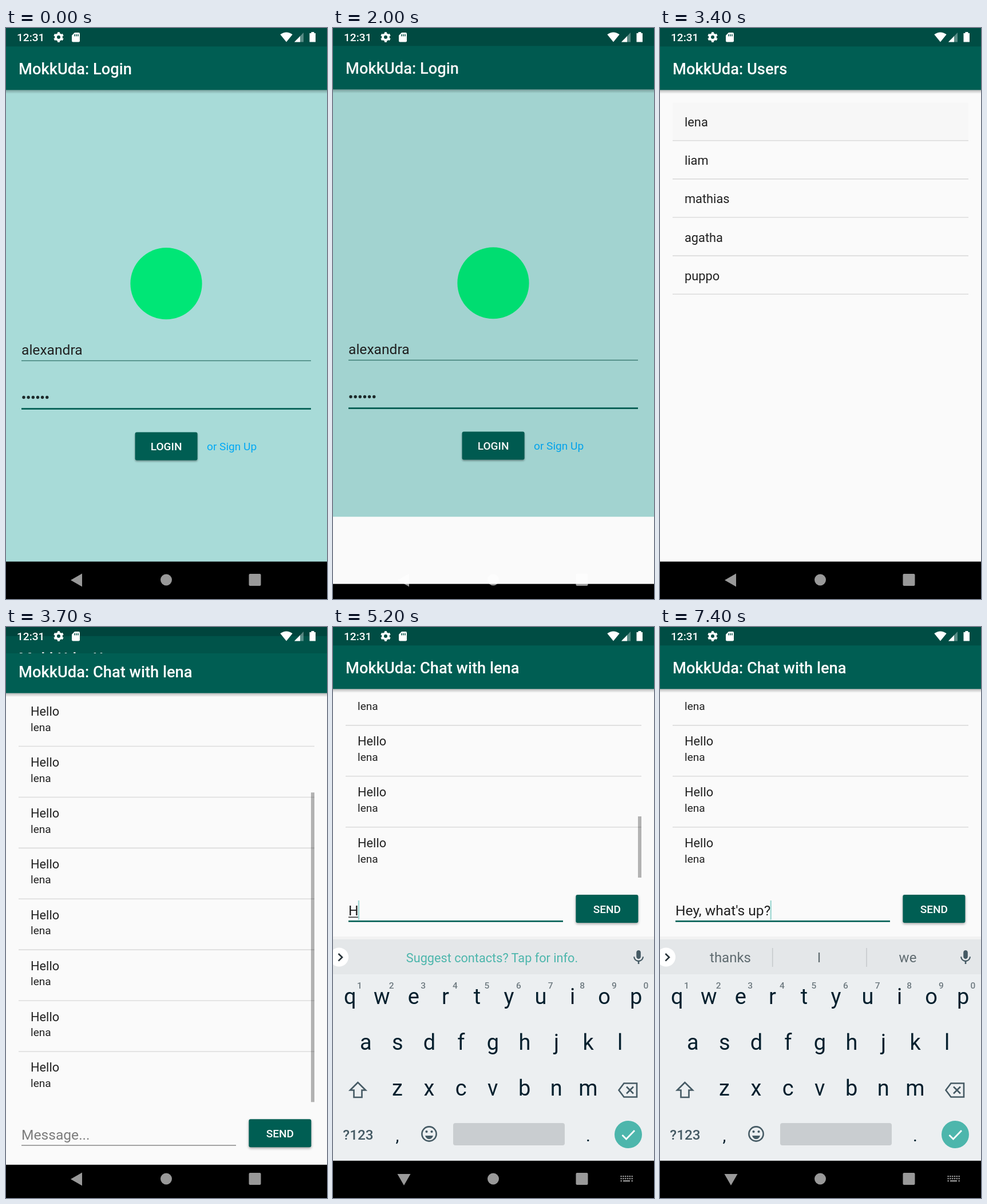
Recreate the animation shown at these times as an HTML page. Size 561 by 998 pixels, loop 8000 ms.

```html
<!DOCTYPE html>
<html lang="en">
<head>
<meta charset="utf-8">
<title>Chat app</title>
<style>
  html, body { margin: 0; width: 100%; height: 100%; overflow: hidden; background: #000; }
  svg { display: block; width: 100vw; height: 100vh; }
  text { font-family: Roboto, sans-serif; fill: #212121; white-space: pre; }
  .medium { font-weight: 500; }
  .white { fill: #fff; }
  .mid { text-anchor: middle; }
  .raised { filter: drop-shadow(0 2px 2px rgba(0, 0, 0, .36)); }
  .rule { fill: none; stroke: #dcdcdc; stroke-width: 1.6; }
  .glyph { fill: none; stroke: #455a64; stroke-width: 2.6; }
  .key { fill: #06202e; }
</style>
</head>
<body>
<svg id="stage" viewBox="0 0 561 998" preserveAspectRatio="none"></svg>
<script>
const TEAL = '#005e53', DARK = '#004d44', PAPER = '#fafafa';
const LOOP = 8000, STEP = 100, LIFT = 385;
const APP = 'MokkUda', FRIEND = 'lena';
const USERS = [FRIEND, 'liam', 'mathias', 'agatha', 'puppo'];
const MESSAGE = "Hey, what's up?";
const KEY_TIMES = [5200, 5400, 5500, 5700, 5800, 6000, 6100, 6200, 6300, 6400, 6500, 6600, 6700, 6900, 7400];
// Suggestions, by number of typed characters
const HINTS = {
  4: ["I'm", 'how', 'are'], 6: ['we', 'what', 'was'], 7: ['who', 'what', 'why'],
  8: ['was', 'what', 'wham'], 9: ['that', 'what', 'whats'], 11: ['whats', "what's", 'what'],
  12: ['up', 'the', 'your'], 13: ['us', 'up', 'under'], 14: ['us', 'up', 'update'],
  15: ['thanks', 'I', 'we']
};

const text = (x, y, str, size, cls = '', more = '') =>
  `<text x="${x}" y="${y}" font-size="${size}" class="${cls}" ${more}>${str}</text>`;
const rect = (x, y, w, h, fill, more = '') =>
  `<rect x="${x}" y="${y}" width="${w}" height="${h}" fill="${fill}" ${more}/>`;
const rule = y => `<path class="rule" d="M22 ${y}H539"/>`;
const list = (n, make) => Array.from({ length: n }, (_, i) => make(i)).join('');

const button = (id, x, y, label) =>
  rect(x, y, 109, 49, TEAL, `rx="3" class="raised" id="${id}"`) +
  text(x + 54.5, y + 31.7, label, 19.1, 'medium white mid');

const screen = (id, title, bg, body) => `<g id="${id}">
  ${rect(0, 0, 561, 998, bg)}${body}
  ${rect(0, 108, 561, 7, 'url(#shade)')}
  ${rect(0, 0, 561, 108.3, TEAL)}${rect(0, 0, 561, 32.3, DARK)}
  ${text(22, 81, APP + ': ' + title, 27.3, 'medium white')}
  ${rect(0, 932.6, 561, 65.4, '#000')}</g>`;

const login =
  '<circle cx="280" cy="446.7" r="62.6" fill="#00e676"/>' +
  text(27, 571, 'alexandra', 24.6) + rect(27, 580.8, 506, 1.4, '#3a7c74') +
  list(6, i => `<circle cx="${31 + 8.15 * i}" cy="645.5" r="2.7" fill="#1d2b2b"/>`) +
  rect(27, 664.2, 506, 2.7, TEAL) +
  button('loginBtn', 225.6, 706.5, 'LOGIN') +
  text(351, 738, 'or Sign Up', 19.1, '', 'style="fill:#03a9f4"');

const users =
  rect(22, 130.5, 517, 66, '#000', 'id="press"') +
  USERS.map((name, i) => text(43, 172 + 67.2 * i, name, 21.8) + rule(196.8 + 67.1 * i)).join('');

const chat =
  `<g clip-path="url(#listClip)"><g id="rows">${list(8, i =>
    text(43, 147.9 + 88.9 * i, 'Hello', 21.8) + text(43, 174.5 + 88.9 * i, FRIEND, 19.1) +
    (i < 7 ? rule(201.3 + 88.9 * i) : ''))}</g></g>` +
  rect(533, 282, 6, 541, 'rgba(0,0,0,.29)', 'id="bar"') +
  `<g id="foot">${text(27, 888.5, '', 24.6, '', 'id="field"')}
  ${rect(27, 891.5, 0, 1.4, '#212121', 'id="compose"')}
  ${rect(27, 863, 2.4, 34, '#a2d9d4', 'id="caret"')}
  ${rect(27, 898, 375, 2.6, TEAL, 'id="line"')}
  ${button('sendBtn', 424.4, 853, 'SEND')}</g>`;

const row = (keys, x, y) => [...keys].map((k, i) =>
  text(x + 55.55 * i, y, k, 38, 'key mid letter')).join('');

const keyboard = `<g id="ime">
  ${rect(0, 541, 561, 5, 'rgba(0,0,0,.03)')}
  ${rect(0, 546, 561, 386.6, '#eceff1')}${rect(0, 546, 561, 61, '#e4e7e9')}
  <circle cx="10.5" cy="577" r="16.6" fill="#fff"/>
  <path d="M9.5 571l6.5 6.3-6.5 6.3" class="glyph" style="stroke:#263238"/>
  ${text(278, 585.5, 'Suggest contacts? Tap for info.', 21.7, 'mid', 'id="tip" style="fill:#4db6ac"')}
  <g id="hints">${[123, 278, 433].map(x => text(x, 586, '', 24, 'mid hint', 'style="fill:#5f6b70"')).join('')}
  <path d="M196.7 561V594M361 561V594" stroke="#c6cacc" stroke-width="1.6"/></g>
  <path transform="translate(518.8 562.4) scale(1.27)" fill="#455a64" d="M12 14c1.66 0 3-1.34 3-3V5c0-1.66-1.34-3-3-3S9 3.34 9 5v6c0 1.66 1.34 3 3 3zm5.3-3c0 3-2.54 5.1-5.3 5.1S6.7 14 6.7 11H5c0 3.41 2.72 6.23 6 6.72V21h2v-3.28c3.28-.48 6-3.3 6-6.72h-1.7z"/>
  ${row('qwertyuiop', 29.8, 658.5)}${row('asdfghjkl', 57.3, 738.5)}${row('zxcvbnm', 112.5, 818.5)}
  ${list(10, i => text(46.5 + 55.6 * i, 632, (i + 1) % 10, 15.5, 'medium mid', 'style="fill:#6e7a80"'))}
  <path id="shift" class="glyph" d="M43.5 796L30 809.5h6.5V822h14V809.5H57Z"/>
  <path class="glyph" d="M499.5 809.5L508.5 797.5H531V821.5H508.5ZM513 803.5l12 12m0-12l-12 12"/>
  ${text(44, 895.5, '?123', 24.3, 'medium mid', 'style="fill:#455a64"')}
  ${text(112.5, 899, ',', 30, 'key mid')}${text(446, 899, '.', 30, 'key mid')}
  <circle cx="168" cy="886" r="12.6" class="glyph"/>
  <path d="M161 889h14q-2 6-7 6t-7-6Z" fill="#455a64"/>
  <circle cx="163.5" cy="882" r="2.1" fill="#455a64"/><circle cx="172.5" cy="882" r="2.1" fill="#455a64"/>
  ${rect(210, 867, 195, 39, '#c9cdd0', 'rx="4"')}
  <circle cx="516" cy="887" r="24" fill="#4db6ac"/>
  <path d="M505.5 888l7 7 14.5-15" fill="none" stroke="#fff" stroke-width="2.8"/></g>`;

const system = `<g fill="#fff">
  ${text(19, 23, '12:31', 19.1, 'medium white')}
  <g fill="none" stroke="#fff"><circle cx="92" cy="16" r="5" stroke-width="4"/>
  <circle cx="92" cy="16" r="7.4" stroke-width="3" pathLength="12" stroke-dasharray="1" stroke-dashoffset="-.5"/></g>
  <path d="M120 8H127a2 2 0 0 1 2 2v12.5a2 2 0 0 1-2 2H117a2 2 0 0 1-2-2V13Z"/>
  <path d="M120 11v3.5m3-3.5v3.5m3-3.5v3.5" stroke="${DARK}" stroke-width="1.5"/>
  <path d="M490 24.5L479.3 11.3Q490 3.5 500.7 11.3Z"/>
  <path d="M504 24.5H520V8Z" opacity=".35"/><path d="M504 24.5H514V14.2Z"/>
  <path d="M533.5 7h5v2h2.5v15.5h-10.5V9h3Z"/>
  <g opacity=".6"><path id="back" d="M113 965L133 953.5V976.5Z"/>
  <circle cx="280" cy="964.5" r="10"/><rect x="424.5" y="954" width="21" height="21" rx="2"/>
  <g id="switcher">${list(3, r => list(6, c =>
    r === 2 && c > 0 && c < 5 ? '' : `<rect x="${502.5 + 3.8 * c}" y="${959 + 4 * r}" width="2.3" height="2.3"/>`))}
  <rect x="507" y="967" width="12" height="2.3"/></g></g></g>`;

document.getElementById('stage').innerHTML = `<defs>
  <linearGradient id="shade" x2="0" y2="1"><stop stop-opacity=".27"/><stop offset="1" stop-opacity="0"/></linearGradient>
  <clipPath id="reveal"><rect id="revealBox" width="561" height="998"/></clipPath>
  <clipPath id="listClip"><rect id="listBox" x="0" y="130" width="561" height="693"/></clipPath></defs>
  ${screen('login', 'Login', '#a8dbd8', login)}
  ${screen('users', 'Users', PAPER, users)}
  ${screen('chat', 'Chat with ' + FRIEND, PAPER, chat)}
  ${keyboard}${system}`;

const el = id => document.getElementById(id);
const set = (id, attrs) => { for (const k in attrs) el(id).setAttribute(k, attrs[k]); };
const show = (id, on) => { el(id).style.display = on ? '' : 'none'; };
const letters = [...document.querySelectorAll('.letter')].map(node => ({ node, key: node.textContent }));
const hintNodes = document.querySelectorAll('.hint');
const pen = document.createElement('canvas').getContext('2d');
const width = str => { pen.font = '24.6px Roboto, sans-serif'; return pen.measureText(str).width; };

const bezier = (p, s) => {
  const r = 1 - s;
  return r * r * r * p[0] + 3 * r * r * s * p[1] + 3 * r * s * s * p[2] + s * s * s * p[3];
};
function curve(x, xs, ys) {
  let lo = 0, hi = 1;
  for (let i = 0; i < 30; i++) {
    const m = (lo + hi) / 2;
    if (bezier(xs, m) < x) lo = m; else hi = m;
  }
  return bezier(ys, lo);
}
const slide = x => curve(x, [0, .4, .2, 1], [0, 0, 1, 1]);
const unveil = x => x < 1 / 6
  ? curve(x, [0, .05, .1333, 1 / 6], [0, 0, .06, .4])
  : curve(x, [1 / 6, .2083, .25, 1], [.4, .82, 1, 1]);

function place(id, y = 0, opacity = 1, clip = 'none') {
  show(id, true);
  set(id, { transform: `translate(0 ${y})`, opacity, 'clip-path': clip });
}

// The next screen rises and unfolds from below while the old one drifts up and dims
function open(from, to, age) {
  const x = Math.min(age / 425, 1), p = slide(x);
  place(from, -20 * p, 1 - .1 * Math.min(age / 150, 1));
  place(to, 41 * (1 - p), 1, 'url(#reveal)');
  set('revealBox', { y: 998 * (1 - unveil(x)) });
}

function drawScreens(t) {
  ['login', 'users', 'chat'].forEach(id => show(id, false));
  if (t < 2000) place('login');
  else if (t < 2400) open('login', 'users', t - 1944.4);
  else if (t < 3600) place('users');
  else if (t < 3900) open('users', 'chat', t - 3470);
  else place('chat');
}

function drawPresses(t) {
  const rise = t === 1300 ? 4 : t === 1400 ? 6 : 2;
  el('loginBtn').style.filter = `drop-shadow(0 ${rise}px ${rise * .8}px rgba(0,0,0,.36))`;
  const glow = t < 3100 ? 0 : [.04, .08, .05][(t - 3100) / STEP] ?? .013;
  set('press', { opacity: glow });
}

function drawChat(t) {
  const up = t >= 4900, focus = t >= 4600;
  const lift = `translate(0 ${up ? -LIFT : 0})`;
  set('rows', { transform: lift });
  set('foot', { transform: lift });
  set('listBox', { height: up ? 308 : 693 });
  set('bar', {
    y: up ? 331 : 282, height: up ? 107 : 541,
    opacity: Math.max(0, Math.min(1, (6325 - t) / 250))
  });
  set('line', { fill: focus ? TEAL : '#808080', height: focus ? 2.6 : 1.4 });

  const count = KEY_TIMES.filter(k => k <= t).length;
  const typed = MESSAGE.slice(0, count);
  const word = (typed.match(/[\w']+$/) || [''])[0];
  const end = 27 + width(typed), start = 27 + width(typed.slice(0, count - word.length));
  el('field').textContent = typed || 'Message...';
  el('field').style.fill = typed ? '#212121' : '#7c7c7c';
  set('caret', { x: typed ? end - .8 : 27 });
  show('caret', focus);
  set('compose', { x: start, width: word ? end - start : 0 });

  show('tip', t >= 5000 && count < 4);
  show('hints', count >= 4);
  const step = Object.keys(HINTS).filter(k => k <= count).pop();
  if (step) hintNodes.forEach((n, i) => { n.textContent = HINTS[step][i]; });
}

function drawKeyboard(t) {
  const phase = t < 4700 ? 0 : t < 4800 ? .15 : t < 4900 ? .85 : 1;
  show('ime', phase > 0);
  set('ime', { transform: `translate(0 ${61 * (1 - phase)})`, opacity: phase });
  set('back', { transform: `rotate(${-90 * phase} 124 965)` });
  show('switcher', phase === 1);
  const caps = t === 5100;
  letters.forEach(l => { l.node.textContent = caps ? l.key.toUpperCase() : l.key; });
  el('shift').style.fill = caps ? '#455a64' : 'none';
}

let last = -1;
function frame() {
  const t = Math.floor(performance.now() % LOOP / STEP) * STEP;
  if (t !== last) {
    last = t;
    drawScreens(t);
    drawPresses(t);
    drawChat(t);
    drawKeyboard(t);
  }
  requestAnimationFrame(frame);
}
frame();
</script>
</body>
</html>
```
